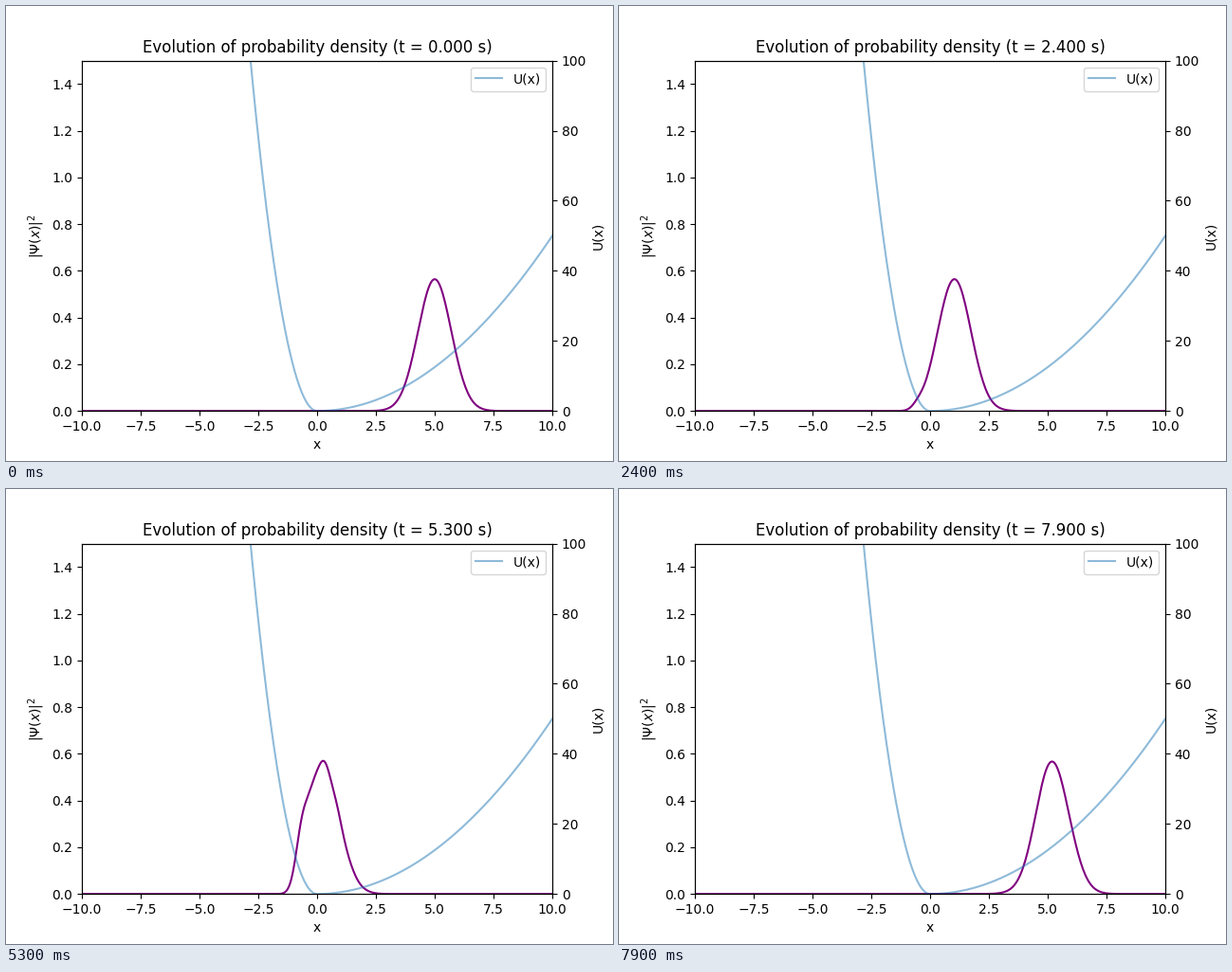
Recreate the animation shown at these times as a matplotlib script. Size 640 by 480 pixels, loop 8000 ms.

```python
import numpy as np
import matplotlib.pyplot as plt
from matplotlib.animation import FuncAnimation

FRAMES, DT = 80, 0.1
GAIN = 0.027  # slow growth of the oscillation energy

x = np.linspace(-10, 10, 401)
dx = x[1] - x[0]
U = np.where(x < 0, 12.5, 0.5) * x**2


def eigenstates(e_max=60):
    """Bound states of the two-sided oscillator on a sinc grid."""
    d = np.subtract.outer(np.arange(x.size), np.arange(x.size))
    far = np.where(d == 0, 1, d)
    kinetic = np.where(d == 0, np.pi**2 / 6, (-1.0) ** np.abs(d) / far**2) / dx**2
    energy, states = np.linalg.eigh(kinetic + np.diag(U))
    keep = energy < e_max
    return energy[keep], states[:, keep]


energy, states = eigenstates()
psi0 = np.pi**-0.25 * np.exp(-((x - 5) ** 2) / 2)
coeffs = states.T @ psi0


def density(t):
    psi = states @ (coeffs * np.exp((GAIN / 2 - 1j) * energy * t))
    rho = np.abs(psi) ** 2
    return rho / (rho.sum() * dx)


fig, ax = plt.subplots(figsize=(6.4, 4.8), dpi=100)
(line,) = ax.plot(x, density(0), color="purple")
ax.set(xlim=(-10, 10), ylim=(0, 1.5), xlabel="x", ylabel=r"$|\Psi(x)|^2$")
title = ax.set_title("")

ax_u = ax.twinx()
ax_u.plot(x, U, color="tab:blue", alpha=0.5, label="U(x)")
ax_u.set(ylim=(0, 100), ylabel="U(x)")
ax_u.legend(loc="upper right")


def update(i):
    t = i * DT
    line.set_ydata(density(t))
    title.set_text(f"Evolution of probability density (t = {t:.3f} s)")
    return line, title


anim = FuncAnimation(fig, update, frames=FRAMES, interval=1000 * DT, repeat=True)
plt.show()
```
